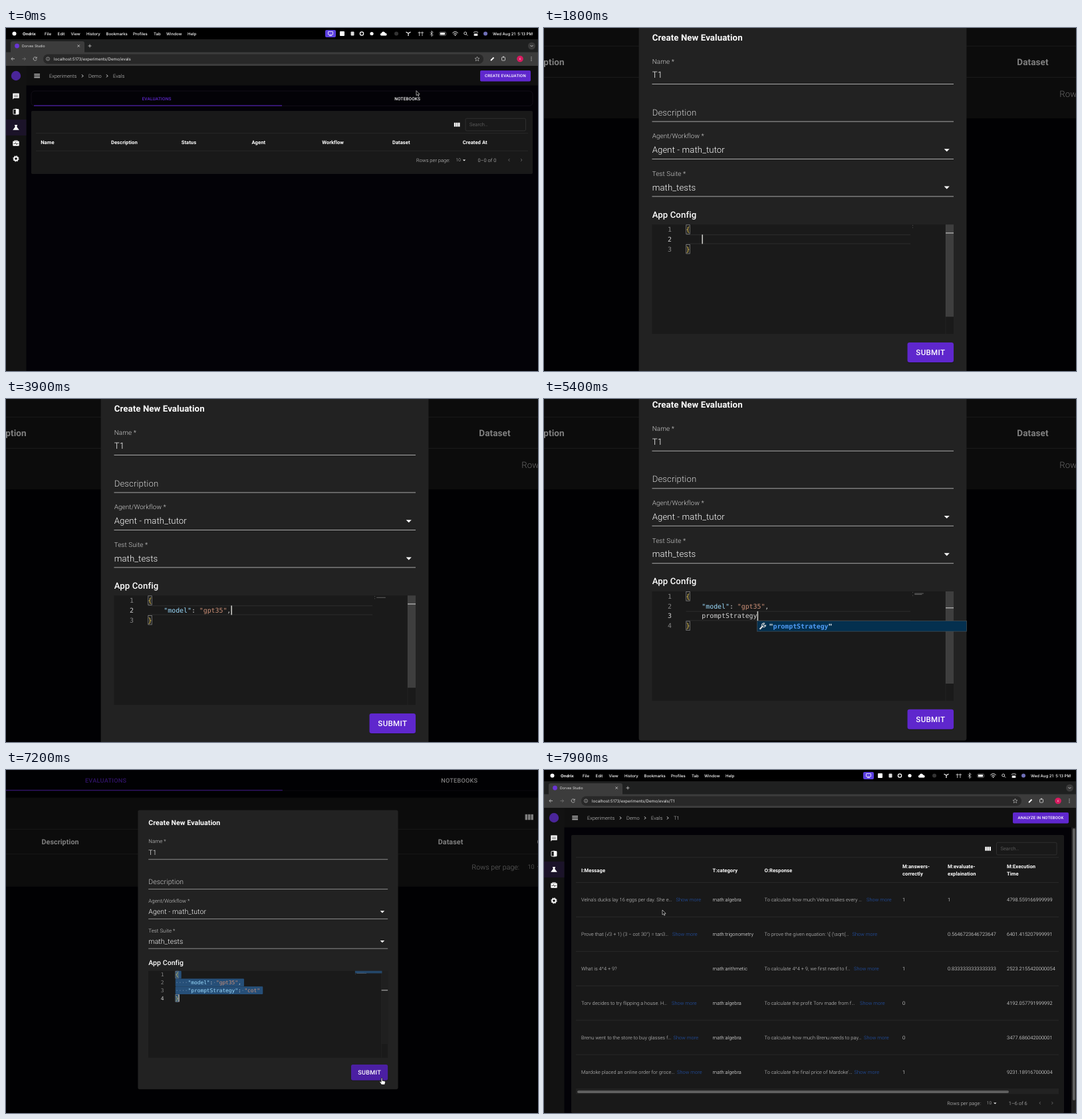
Recreate the animation shown at these times as an HTML page. Size 800 by 517 pixels, loop 8000 ms.

```html
<!DOCTYPE html>
<html lang="en">
<head>
<meta charset="utf-8">
<title>Create evaluation</title>
<style>
  html, body { margin: 0; width: 100%; height: 100%; overflow: hidden; background: #000; }
  svg { display: block; width: 100vw; height: 100vh; }
  text { font-family: Roboto, Arial, sans-serif; font-weight: 300; letter-spacing: .009em; white-space: pre; text-rendering: geometricPrecision; }
  .ui { font-family: Inter, Roboto, sans-serif; letter-spacing: 0; }
  .mono { font-family: "DejaVu Sans Mono", monospace; font-weight: 400; letter-spacing: 0; }
  .caps { letter-spacing: .0286em; font-weight: 500; }
</style>
</head>
<body>
<svg id="stage" viewBox="0 0 800 517" preserveAspectRatio="none"></svg>
<script>
const LOOP = 8000, ZOOM = 1.776, PIVOT = [413, 328];
const PURPLE = '#5f27cd', PANEL = '#191919', RULE = '#333';

const clamp = v => Math.max(0, Math.min(1, v));
const ramp = (t, a, b) => clamp((t - a) / (b - a));
const smooth = p => p * p * (3 - 2 * p);
const lerp = (a, b, p) => a + (b - a) * p;

// Shape helpers; text y is the vertical centre of the capitals.
const text = (x, y, s, size = 7.41, { fill = '#d0d0d0', w, anchor = 'start', cls = '' } = {}) =>
  `<text x="${x}" y="${y + size * .355}" font-size="${size}" fill="${fill}" text-anchor="${anchor}" class="${cls}"${w ? ` style="font-weight:${w}"` : ''}>${s}</text>`;
const rect = (x, y, w, h, fill, r = 0, more = '') =>
  `<rect x="${x}" y="${y}" width="${w}" height="${h}" fill="${fill}" rx="${r}" ${more}/>`;
const frame = (x, y, w, h, stroke, r = 0, sw = .6) =>
  rect(x, y, w, h, 'none', r, `stroke="${stroke}" stroke-width="${sw}"`);
const dot = (x, y, r, fill) => `<circle cx="${x}" cy="${y}" r="${r}" fill="${fill}"/>`;
const ring = (x, y, r, stroke, sw = .8) => `<circle cx="${x}" cy="${y}" r="${r}" fill="none" stroke="${stroke}" stroke-width="${sw}"/>`;
const line = (d, stroke = '#fff', sw = .8) => `<path d="${d}" fill="none" stroke="${stroke}" stroke-width="${sw}"/>`;
const fill = (d, color = '#fff') => `<path d="${d}" fill="${color}"/>`;
const hline = (x1, x2, y, color, sw = .6) => line(`M${x1} ${y}H${x2}`, color, sw);
const chevron = (x, y, dir = 1, color = '#fff', r = 2) => line(`M${x - dir * r / 2} ${y - r}l${dir * r} ${r}l${-dir * r} ${r}`, color, .9);
const drop = (x, y, r = 2.2) => fill(`M${x - r} ${y - r / 2}h${2 * r}l${-r} ${r}z`);
const button = (x1, x2, label) => rect(x1, 64, x2 - x1, 16.5, PURPLE, 1.9) +
  text((x1 + x2) / 2, 72.2, label, 6.02, { fill: '#fff', anchor: 'middle', cls: 'caps' });

function menuBar() {
  const items = [['Ondrix', 25], ['File', 58], ['Edit', 77.5], ['View', 97.5], ['History', 121], ['Bookmarks', 150.5],
    ['Profiles', 191], ['Tab', 222], ['Window', 241], ['Help', 273]];
  return rect(0, 0, 800, 17, '#000') + dot(12.5, 8.5, 3, '#fff') +
    items.map(([s, x], i) => text(x, 8.5, s, 6.02, { fill: '#fff', w: i ? 500 : 700, cls: 'ui' })).join('') +
    rect(480, 3, 16, 11, '#5b3fe0', 2) + frame(484.5, 5.5, 7, 4.6, '#fff', .5, .8) + hline(486, 490, 11.5, '#fff', .8) +
    rect(502, 5, 7, 7, '#fff', 1) + rect(518.5, 5.5, 5, 6, '#ddd', 1) +
    ring(535, 8.5, 2.6, '#fff', 1.3) + dot(550, 8.5, 2.6, '#fff') +
    fill('M564 11.5a2 2 0 0 1 .6-3.8a3 3 0 0 1 5.6-.3a2.2 2.2 0 0 1 1.3 4.1z') + dot(587, 8.5, 3, '#333') +
    line('M601.5 6l3.5 2v4M608.5 6l-3.5 2', '#fff', 1.2) + line('M621.5 5.5v6.5M626 5.5v6.5M619.5 7h8.5', '#ddd') +
    line('M638 6.5l4 4l-2 2v-8l2 2l-4 4', '#fff', .7) +
    frame(652, 6, 9.5, 5.2, '#bbb', 1.4) + rect(653, 7, 7, 3.2, '#fff', .6) +
    line('M671.5 7.5q4-3.6 8 0M673 9.3q2.5-2 5 0', '#fff', 1) + dot(675.5, 10.8, .9, '#fff') +
    ring(690.7, 8, 2, '#fff') + line('M692.2 9.5l2 2', '#fff') +
    frame(703.5, 5.5, 6, 2.5, '#fff', 1.2) + rect(703.5, 9, 6, 2.8, '#fff', 1.3) +
    dot(721, 8.5, 3, '#6f6fb8') +
    text(732, 8.5, 'Wed Aug 21  5:13 PM', 6.02, { fill: '#fff', w: 500, cls: 'ui' });
}

function browser() {
  const grey = '#c7c7c7';
  return rect(0, 17, 800, 20, '#1f2020') + rect(7, 20, 111, 20, '#3c3c3c', 3) + rect(0, 36.5, 800, 20.5, '#3c3c3c') +
    dot(16.5, 27, 3.4, '#6a35d4') + text(24, 27, 'Dorvex Studio', 5.2, { fill: '#e4e4e4', w: 400, cls: 'ui' }) +
    line('M107.5 25.3l3.4 3.4m0-3.4l-3.4 3.4', '#ddd', .7) + line('M123.5 27h5m-2.5-2.5v5', '#ddd', .7) +
    dot(790.5, 27, 5.5, '#3a3a3a') + line('M788.5 26l2 2l2-2', '#ddd') +
    rect(56, 39.5, 662, 14.5, '#282828', 7.2) +
    line('M13 46.5h-5m2.3-2.4l-2.4 2.4l2.4 2.4', grey) + line('M24.5 46.5h5m-2.3-2.4l2.4 2.4l-2.4 2.4', '#777') +
    line('M45.6 44.6a2.6 2.6 0 1 0 .6 2.6M46.2 43.5v2h-2', grey) +
    ring(63, 46.5, 2.6, grey, .6) + line('M63 46v1.8M63 44.9v.6', grey, .6) +
    line('M708.5 43.2l1 2.2l2.4.2l-1.8 1.6l.6 2.4l-2.2-1.3l-2.2 1.3l.6-2.4l-1.8-1.6l2.4-.2z', grey, .6) +
    line('M729 49l4.5-4.5', '#fff', 1.8) + frame(745.5, 44, 5, 5, grey, .8, .9) + dot(748, 43.6, 1.1, grey) +
    dot(773, 46.5, 4.8, '#d81b60') + text(773, 46.5, 'c', 5, { fill: '#fff', anchor: 'middle', w: 400 }) +
    [44, 46.5, 49].map(y => dot(790, y, .65, grey)).join('');
}

function shell(crumbs) {
  return rect(0, 57, 800, 460, '#030207') + rect(30, 57, 770, 29.5, '#101010') + rect(0, 57, 30.5, 460, '#121212') +
    dot(15, 72, 7.2, '#4a2599') + rect(0, 138, 30.5, 24, '#1b1329') +
    fill('M10.3 98.5h9.4v7.2h-7.5l-1.9 1.9z') + line('M12 101.3h6M12 103.5h6', '#222', .7) +
    frame(11, 122.5, 8, 7.5, '#fff', .6, .9) + rect(15, 122.5, 4, 7.5, '#fff') + line('M15 121.2v10', '#fff') +
    fill('M13 146h4v.9l-.6.5v1.8l3.4 4.6h-9.6l3.4-4.6v-1.8l-.6-.5z') +
    rect(10.3, 170.6, 9.4, 7.2, '#fff', .8) + frame(13, 169.6, 4, 1.5, '#fff') + line('M11.5 174.300h2l1-1.6 1.400 3 .9-1.400h1.700', '#121212') +
    ring(15, 197, 2.8, '#fff', 2) + `<circle cx="15" cy="197" r="4.2" fill="none" stroke="#fff" stroke-width="1" stroke-dasharray="1.65"/>` +
    [69.7, 72.2, 74.7].map(y => hline(42.3, 51, y, '#fff', 1)).join('') +
    crumbs.map(([s, x], i) => text(x, 72.2, s) + (i ? chevron(x - 9, 72.3) : '')).join('');
}

const search = (x, y) => [0, 3.1, 6.2].map(d => rect(x + d - 17.2, y + 6.4, 2.5, 6, '#fff')).join('') +
  frame(x, y, 90.5, 18.6, '#3d3d3d', 1.8) + text(x + 6, y + 9.5, 'Search…', 7.41, { fill: '#757575' });

const pager = (x, y, range) => text(x, y, 'Rows per page:') + text(x + 59.5, y, '10', 6.48) + drop(x + 72, y + .5) +
  text(x + 92.5, y, range) + chevron(x + 139.5, y, -1, '#666') + chevron(x + 158, y, 1, '#666');

const heading = (x, y, s) => text(x, y, s, 7.6, { fill: '#fff', w: 700 });

function listPage() {
  const columns = ['Name', 'Description', 'Status', 'Agent', 'Workflow', 'Dataset', 'Created At'];
  return shell([['Experiments', 65], ['Demo', 124], ['Evals', 161]]) + button(713, 789, 'CREATE EVALUATION') +
    frame(38, 95, 754, 22.3, '#1b1723', 5) +
    text(226.5, 106.2, 'EVALUATIONS', 6.48, { fill: PURPLE, anchor: 'middle', cls: 'caps' }) +
    text(603.7, 106.2, 'NOTEBOOKS', 6.48, { fill: '#fff', anchor: 'middle', cls: 'caps' }) +
    rect(42, 116.5, 373, 1, PURPLE) +
    rect(38, 125, 754, 95, PANEL, 1.8) + search(691, 136.3) + hline(45, 785, 158.7, RULE) + hline(45, 785, 185.2, RULE) +
    columns.map((s, i) => heading(52.2 + i * 105.75, 172, s)).join('') + pager(617, 199, '0–0 of 0');
}

function resultPage() {
  const rows = [
    ["Velna's ducks lay 16 eggs per day. She e…", 198.5, 'algebra', 'To calculate how much Velna makes every …', 485, '1', '1', '4798.559166999999'],
    ['Prove that (√3 + 1) (3 − cot 30°) = tan3…', 193, 'trigonometry', 'To prove the given equation: \\[ (\\sqrt{…', 463.5, '', '0.5646723646723647', '6401.415207999991'],
    ['What is 4^4 + 9?', 0, 'arithmetic', 'To calculate 4^4 + 9, we first need to f…', 466, '1', '0.8333333333333333', '2523.2155420000054'],
    ['Torv decides to try flipping a house. H…', 192, 'algebra', 'To calculate the profit Torv made from f…', 475, '0', '', '4192.057791999992'],
    ['Brenu went to the store to buy glasses f…', 194.5, 'algebra', 'To calculate how much Brenu needs to pay…', 481, '0', '', '3477.686042000001'],
    ['Mardoke placed an online order for groce…', 200, 'algebra', "To calculate the final price of Mardoke'…", 466.5, '1', '', '9231.189167000004']
  ];
  const more = (x, y) => x ? text(x, y, 'Show more', 7.41, { fill: '#2257b8' }) : '';
  const white = { fill: '#fff' };
  const body = rows.map(([msg, mx, cat, reply, rx, ok, score, time], i) => {
    const y = 195.5 + i * 51.9;
    return text(56, y, msg) + more(mx, y) + text(253.5, y, 'math:' + cat, 7.41, white) + text(331.5, y, reply) + more(rx, y) +
      text(539, y, ok, 7.41, white) + text(607, y, score, 7.41, white) + text(696, y, time, 7.41, white) + hline(48, 774, y + 26, RULE);
  }).join('');
  const pairs = [['M:answers-', 'correctly', 539], ['M:evaluate-', 'explaination', 607], ['M:Execution', 'Time', 696]];
  return shell([['Experiments', 65], ['Demo', 124], ['Evals', 161], ['T1', 195]]) + button(705, 789, 'ANALYZE IN NOTEBOOK') +
    rect(41, 98, 741, 419, PANEL, 1.8) + search(680.5, 109.3) + hline(48, 774, 131.7, RULE) + hline(48, 774, 169.5, RULE) +
    heading(56, 151, 'I:Message') + heading(253.5, 151, 'T:category') + heading(331.5, 151, 'O:Response') +
    pairs.map(([a, b, x]) => heading(x, 145.5, a) + heading(x, 156.5, b)).join('') + body +
    rect(48, 481.5, 726, 7, '#222') + rect(50, 483.2, 649, 3.8, '#616161', 1.9) +
    rect(793, 86.5, 7, 430.5, '#202020') + rect(795, 88, 3.8, 410, '#616161', 1.9) + pager(606.3, 502, '1–6 of 6');
}

// The dialog is laid out at full zoom.
const underline = (y, color = '#b8b8b8', sw = .9) => hline(162.5, 616, y, color, sw);

function dialog() {
  const field = (label, value, y) => text(162.7, y, label, 9.87) + text(162.7, y + 20.6, value, 13.15, { fill: '#fff' }) +
    underline(y + 34.5) + drop(605.7, y + 21.2, 4.1);
  return rect(142.6, -9, 492.8, 530, '#222', 3.3) +
    text(162.7, 14.5, 'Create New Evaluation', 13.2, { fill: '#fff', w: 700 }) +
    `<g id="name"></g>` + text(162.7, 127, 'Description', 13.15) + underline(141) +
    field('Agent/Workflow *', 'Agent - math_tutor', 163) + field('Test Suite *', 'math_tests', 219.4) +
    text(162.7, 281, 'App Config', 13.15, { fill: '#fff', w: 500 }) + `<g id="editor"></g>` +
    rect(546.5, 475, 69.5, 30, '#000', 3.3, 'opacity=".3"') + rect(546.5, 474, 69.5, 30, PURPLE, 3.3, 'id="submit"') +
    text(581.3, 489, 'SUBMIT', 11.5, { fill: '#fff', anchor: 'middle', cls: 'caps' });
}

function nameField(value, focused) {
  return text(162.7, 50.3, 'Name *', 9.87, focused ? { fill: PURPLE } : {}) + text(162.7, 70.8, value, 13.15, { fill: '#fff' }) +
    (focused ? underline(84, PURPLE, 1.8) + rect(163.5 + value.length * 7.4, 63, 1, 15.5, '#fff') : underline(84.5));
}

const CH = 5.94, ROW = 14.8, CODE_X = 213.6, TOP = 296.2;

function codeLine(s, y, selected) {
  let strings = 0;
  const spans = (s.match(/"[^"]*"?|[{}]|\s+|[^"{}\s]+/g) || []).map(tok => {
    const space = /^\s/.test(tok);
    const color = tok[0] === '"' ? (strings++ ? '#ce9178' : '#9cdcfe') : /[{}]/.test(tok) ? '#f5d660' : space ? '#6d8aa8' : '#d4d4d4';
    return `<tspan fill="${color}">${space && selected ? '·'.repeat(tok.length) : tok}</tspan>`;
  });
  return `<text class="mono" x="${CODE_X}" y="${y + 3.5}" font-size="9.866">${spans.join('')}</text>`;
}

function editor({ lines, row, focused, selected, popup }) {
  const y = i => TOP + i * ROW, last = lines.length - 1, caretX = CODE_X + lines[row].length * CH;
  let out = rect(162.5, TOP, 453.5, 164.8, '#1a1a1a') + line(`M604 ${TOP}v164.8`, '#272727', .8);
  if (!selected) out += hline(CODE_X, 551, y(row) + .6, '#292929', 1.2) + hline(CODE_X, 551, y(row) + ROW - .6, '#292929', 1.2);
  lines.forEach((s, i) => {
    if (selected) out += rect(CODE_X, y(i), (s.length + (i < last ? .9 : 0)) * CH, ROW, '#264f78', 1.5);
    if (last && (i === 0 || i === last)) out += frame(CODE_X + .2, y(i) + .6, CH - .5, ROW - 1.2, '#888', 0, .8);
    out += text(192, y(i) + 7.4, i + 1, 9.866, { fill: i === row ? '#d0d0d0' : '#858585', anchor: 'end', cls: 'mono' }) + codeLine(s, y(i) + 7.4, selected);
    const code = s.trim();
    if (code) out += rect(554 + (s.length - code.length) * .8, 297.2 + i * 1.6, code.length * .8, .9, '#8a8a8a', 0, 'opacity=".7"');
  });
  if (selected) out += rect(554, TOP, 51, 4.6, '#264f78', 0, 'opacity=".85"');
  if (focused) out += rect(604, TOP, 12, 139, '#797979', 0, `opacity="${selected ? .06 : .38}"`) +
    rect(604, TOP + row * 12, 12, 1.6, '#a0a0a0') + rect(caretX, y(row) + .4, 1.6, ROW - .8, '#c8c8c4');
  if (popup) {
    const py = y(row + 1), label = s => `<tspan fill="#4f9bf5">${s}</tspan>`;
    out += rect(caretX, py, 635.4 - caretX, 15.8, '#04304f', 0, 'stroke="#3f4a52" stroke-width=".8"') +
      line(`M${caretX + 4} ${py + 12.5}l4.5-5`, '#ddd', 2.2) + line(`M${caretX + 11} ${py + 3.6}a3 3 0 1 0 2 3l-2.2.7l-1.4-1.5z`, '#ddd', 1.1) +
      text(caretX + 18, py + 7.9, '"' + label('promptStrategy') + '"', 9.866, { fill: '#fff', w: 700, cls: 'mono' });
  }
  return out;
}

function editorState(t) {
  if (t < 1550) return { lines: ['{}'], row: 0, focused: false };
  const typed = (s, a, b) => s.slice(0, Math.floor(s.length * ramp(t, a, b)));
  const lines = ['{', '    ' + typed('"model": "gpt35",', 1900, 3850)];
  if (t >= 4100) lines.push('    ' + (t < 5500 ? typed('promptStrategy', 4200, 5350) : '"promptStrategy"' + typed(': "cot"', 5600, 6250)));
  lines.push('}');
  const selected = t >= 6600;
  return { lines, row: selected ? lines.length - 1 : lines.length - 2, focused: true, selected, popup: t >= 4700 && t < 5500 };
}

const PATH = [[0, 617, 94.5], [50, 617, 94.5], [330, 752, 73], [430, 752, 73], [850, 474.4, 270.5], [1020, 474.4, 270.5], [1350, 400, 318],
  [6650, 400, 318], [7050, 518.6, 424.5], [7300, 518.6, 424.5], [7820, 178, 211]];

function pointer(t) {
  let i = 0;
  while (i < PATH.length - 2 && t >= PATH[i + 1][0]) i++;
  const [a, x1, y1] = PATH[i], [b, x2, y2] = PATH[i + 1], p = smooth(ramp(t, a, b));
  return [lerp(x1, x2, p), lerp(y1, y2, p)];
}

const stage = document.getElementById('stage');
const aroundPivot = s => `translate(${PIVOT}) scale(${s}) translate(${PIVOT.map(v => -v)})`;
stage.innerHTML = `<g id="world"><g id="list">${listPage()}</g><g id="results">${resultPage()}</g>
  ${browser()}<g id="url"></g>${menuBar()}
  <g id="modal">${rect(0, 57, 800, 460, '#000', 0, 'opacity=".5"')}
    <g transform="${aroundPivot(1 / ZOOM)}"><g id="dialog">${dialog()}</g></g></g>
  <g id="pointer">
    <path id="arrow" d="M0 0V7.2L1.7 5.7 2.8 8.2 4 7.7 2.9 5.3H5.1Z" fill="#000" stroke="#fff" stroke-width=".6"/>
    <path id="hand" d="M1.6.6C1.6-.3 2.9-.3 2.9.6V3L5 3.4C6 3.6 6.2 4.2 6 5.2L5.5 7.3H2L.2 4.7C-.3 3.9.6 3.4 1.1 4L1.6 4.5Z" fill="#fff" stroke="#000" stroke-width=".5"/>
  </g></g>`;

const el = id => document.getElementById(id);
const show = (id, on) => el(id).setAttribute('display', on ? 'inline' : 'none');
const cache = {};
function put(id, html) {
  if (cache[id] !== html) el(id).innerHTML = cache[id] = html;
}

function render(t) {
  const zoom = 1 + (ZOOM - 1) * (smooth(ramp(t, 700, 1455)) - smooth(ramp(t, 6840, 7590)));
  el('world').setAttribute('transform', aroundPivot(zoom));

  const done = t >= 7480;
  show('list', !done);
  show('results', done);
  put('url', text(72, 46.5, 'localhost:5173/experiments/Demo/evals' + (done ? '/T1' : ''), 6.15, { fill: '#e8e8e8', w: 400, cls: 'ui' }));

  const opacity = ramp(t, 420, 540) * (1 - ramp(t, 7360, 7470));
  show('modal', opacity > 0);
  el('modal').setAttribute('opacity', opacity);
  const state = editorState(t);
  el('dialog').setAttribute('transform', `translate(0 ${state.popup ? -6.2 : 0})`);
  put('name', nameField('T1'.slice(0, (t >= 750) + (t >= 880)), t < 1400));
  put('editor', editor(state));

  const overSubmit = t >= 7000 && t < 7360;
  el('submit').setAttribute('fill', overSubmit ? '#4b1fa3' : PURPLE);
  show('pointer', t < 1500 || t >= 6450);
  el('pointer').setAttribute('transform', `translate(${pointer(t)})`);
  const hand = overSubmit || (t > 290 && t < 460);
  show('hand', hand);
  show('arrow', !hand);
}

const start = performance.now();
function tick() {
  render((performance.now() - start) % LOOP);
  requestAnimationFrame(tick);
}
tick();
</script>
</body>
</html>
```
